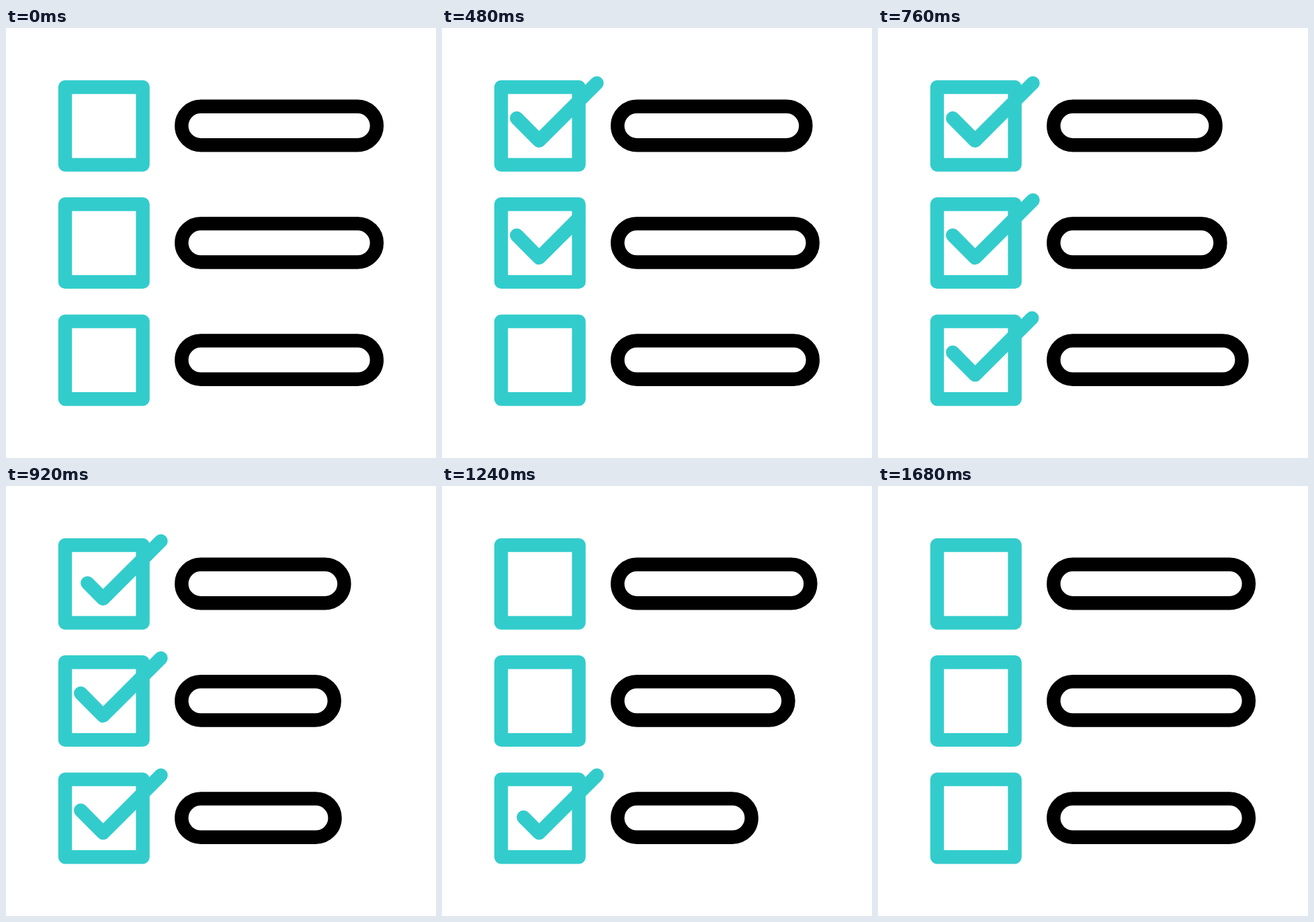
Write an HTML page that moves like this. It is 640 px wide and 640 px high and loops after 2000 ms.

```html
<!DOCTYPE html>
<html lang="en">
<head>
<meta charset="utf-8">
<title>Checklist</title>
<style>
  html, body { margin: 0; height: 100%; overflow: hidden; background: #fff; }
  svg { display: block; width: 100%; height: 100%; }
  g { fill: none; stroke: #3cc; stroke-width: 20.4; stroke-linejoin: round; stroke-linecap: round; }
  .bar { stroke: #000; }
</style>
</head>
<body>
<svg viewBox="0 0 640 640"></svg>
<script>
const LOOP = 2000, STEP = 40, ROW_GAP = 174.3, ROW_DELAY = 160;
const BAR_WIDTH = 290.6;
const shrinkBy = [50, 64, 94];

const svg = document.querySelector('svg');
svg.innerHTML = shrinkBy.map((_, i) => `
  <g transform="translate(0 ${i * ROW_GAP})">
    <rect x="88" y="88" width="115.6" height="115.6"/>
    <rect class="bar" x="261.3" y="116.8" width="${BAR_WIDTH}" height="57.4" rx="28.7"/>
    <path class="check" pathLength="1" d="M111.2 134.2L144.5 167.8L230.5 81.9"/>
  </g>`).join('');
const bars = svg.querySelectorAll('.bar');
const checks = svg.querySelectorAll('.check');

const progress = (t, from, to) => Math.min(1, Math.max(0, (t - from) / (to - from)));
const easeIn = (u, power) => u ** power;
const easeOut = (u, power) => 1 - (1 - u) ** power;
const easeInOut = (u, power) => u ** power / (u ** power + (1 - u) ** power);

function drawRow(i, t) {
  const shrink = t < 828 ? progress(t, 290, 828) : 1 - progress(t, 828, 1366);
  bars[i].setAttribute('width', BAR_WIDTH - shrinkBy[i] * easeInOut(shrink, 2.2));

  const head = easeOut(progress(t, 200, 508), 3);
  const tail = easeIn(progress(t, 825, 1073), 2.57);
  const { style } = checks[i];
  style.display = head > tail ? '' : 'none';
  style.strokeDasharray = `${head - tail} 9`;
  style.strokeDashoffset = -tail;
}

function render(now) {
  const t = Math.floor((now % LOOP) / STEP) * STEP;
  shrinkBy.forEach((_, i) => drawRow(i, t - i * ROW_DELAY));
  requestAnimationFrame(render);
}
render(0);
</script>
</body>
</html>
```
